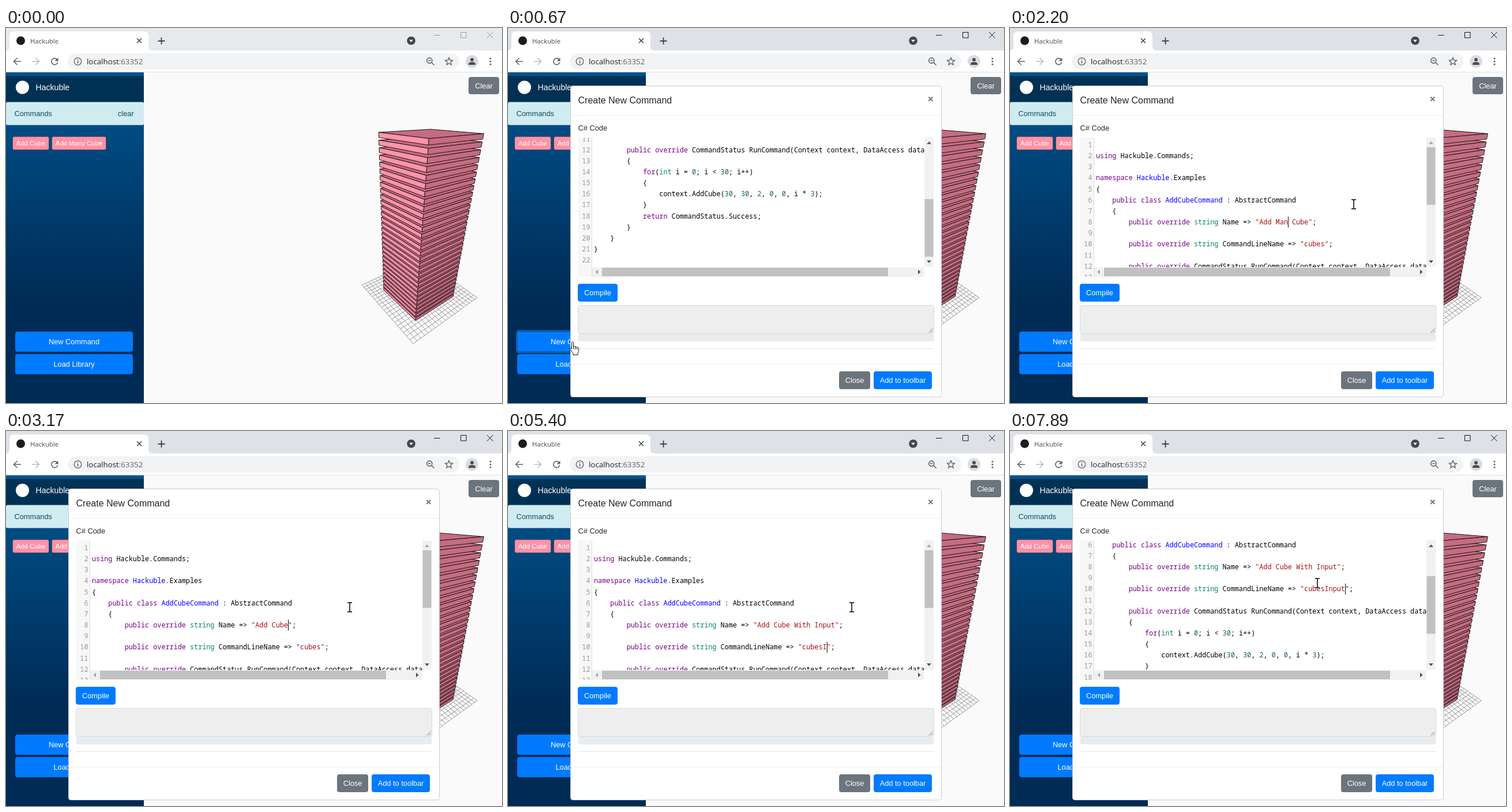
Write an HTML page that moves like this. It is 860 by 651 pixels and loops after 8 s.

```html
<!DOCTYPE html>
<html lang="en">
<head>
<meta charset="utf-8">
<title>Create New Command</title>
<style>
html, body { margin: 0; width: 100%; height: 100%; overflow: hidden; background: #fff; }
svg { display: block; width: 860px; height: 651px; }
text { font: 12.8px "Liberation Sans", Arial, sans-serif; white-space: pre; fill: #212529; }
.ui { font-family: "Open Sans", "Noto Sans", sans-serif; }
.code text { font: 11.8px "Noto Sans Mono", monospace; fill: #000; }
.code .num { fill: #999; text-anchor: end; }
.mid { text-anchor: middle; fill: #fff; }
.icon { fill: none; stroke: #5f6368; stroke-width: 1.6; }
.kw { fill: #708; } .type { fill: #085; } .def { fill: #00f; }
.str { fill: #a11; } .lit { fill: #164; }
</style>
</head>
<body>
<svg id="stage" viewBox="0 0 860 651" xmlns="http://www.w3.org/2000/svg">
  <defs>
    <linearGradient id="side" x1="0" y1="0" x2="0" y2="1">
      <stop offset="0" stop-color="#005590"/><stop offset=".7" stop-color="#002b55"/>
    </linearGradient>
    <clipPath id="view"><rect x="146" y="190" width="576" height="225"/></clipPath>
    <clipPath id="rail"><rect x="121" y="190" width="25" height="242"/></clipPath>
  </defs>

  <!-- browser frame -->
  <rect id="strip" width="860" height="40"/>
  <path d="M0 39q6 0 6-7V14q0-8 8-8H239q8 0 8 8V32q0 7 7 7z" fill="#fff"/>
  <rect y="39" width="860" height="38" fill="#fff"/>
  <rect y="76" width="860" height="1" fill="#dcdee1"/>
  <circle cx="25.5" cy="22" r="7.5" fill="#1c1c1c"/>
  <text class="ui" x="42" y="27" style="font-size:11.3px;fill:#45494d">Hackuble</text>
  <path class="icon" d="M227 18l8 8m0-8l-8 8" style="stroke:#3c4043;stroke-width:1.5"/>
  <path class="icon" d="M263.500 22.500h12m-6-6v12" style="stroke:#3c4043;stroke-width:1.8"/>
  <circle cx="702.500" cy="22" r="7.300" fill="#43474b"/>
  <path d="M699 20.500h7l-3.500 4z" fill="#fff"/>
  <path id="win" fill="none" d="M742 12.500h10.500M788.500 7.500h9.500v9.500h-9.500zM834 7l10.500 10.500m0-10.500L834 17.500"/>
  <path class="icon" d="M26 58H14m5.500-6l-6 6 6 6"/>
  <path class="icon" d="M45 58h12m-5.500-6l6 6-6 6" style="stroke:#b9bcc0"/>
  <path class="icon" d="M88.500 54.500a5.500 5.500 0 1 0 1.200 5"/>
  <path d="M90.500 51.500v6h-6z" fill="#5f6368"/>
  <rect x="107" y="44" width="679" height="28" rx="14" fill="#f1f3f4"/>
  <circle class="icon" cx="124.500" cy="58" r="6.300" style="stroke-width:1.300"/>
  <path class="icon" d="M124.500 57v4.500m0-7.500v1.500"/>
  <text class="ui" x="140" y="63" style="font-size:13.300px;fill:#202124">localhost<tspan fill="#5f6368">:63352</tspan></text>
  <circle class="icon" cx="734.300" cy="56.500" r="4.600"/>
  <path class="icon" d="M738 60l4.500 4.500M732 56.500h4.600" style="stroke-width:1.500"/>
  <path class="icon" d="M768 51.500l1.900 4.300 4.600.4-3.500 3.100 1.100 4.600-4.100-2.500-4.100 2.500 1.100-4.600-3.500-3.100 4.600-.4z" style="stroke-width:1.400"/>
  <circle cx="808" cy="58" r="11" fill="#dadce0"/>
  <circle cx="808" cy="55" r="3" fill="#4a4e52"/>
  <path d="M802 64v-1.500q0-3.500 6-3.500t6 3.500V64z" fill="#4a4e52"/>
  <g fill="#5f6368"><circle cx="840" cy="53" r="1.600"/><circle cx="840" cy="58" r="1.600"/><circle cx="840" cy="63" r="1.600"/></g>

  <!-- page -->
  <rect y="77" width="860" height="574" fill="#fafafa"/>
  <g id="tower"></g>
  <rect y="77" width="239" height="574" fill="url(#side)"/>
  <rect y="83" width="239" height="46" fill="#000" opacity=".4"/>
  <circle cx="28.500" cy="103" r="11.500" fill="#fff"/>
  <text x="51.500" y="107.500" style="font-size:14.080px;fill:#fff">Hackuble</text>
  <rect y="128.500" width="239" height="40" rx="3" fill="#d1ecf1"/>
  <text x="14.500" y="153" style="fill:#0c4a66">Commands</text>
  <text x="194" y="153" style="fill:#0c4a66">clear</text>
  <g id="page"></g>

  <!-- dialog -->
  <g id="modal">
    <rect x="108.500" y="100.500" width="643" height="540" rx="4" fill="#fff" stroke="#ccc"/>
    <path d="M109 151.500H751M109 583.500H751" stroke="#eceef1"/>
    <text x="121.500" y="131" style="font-size:16px">Create New Command</text>
    <path d="M729.300 119.700l7 7m0-7l-7 7" stroke="#7a7a7a" stroke-width="2.200"/>
    <text x="121.500" y="178">C# Code</text>
    <rect x="121.500" y="190" width="24" height="242" fill="#f7f7f7"/>
    <path d="M145.500 190V432" stroke="#ddd"/>
    <g class="code" clip-path="url(#rail)"><g id="nums"></g></g>
    <g class="code" clip-path="url(#view)">
      <g id="lines"><rect id="caret" width="1" height="19" fill="#000"/></g>
    </g>
    <path d="M722 190h16v225h-16zM146 415.500h575.500V432H146z" fill="#f1f1f1"/>
    <rect id="thumb" x="722.500" width="15" height="100" fill="#c1c1c1"/>
    <rect x="163" y="416" width="496" height="15" fill="#c1c1c1"/>
    <path id="up" d="M726 201.500h8l-4-4.500z"/>
    <path d="M726 403.500h8l-4 4.500zM711 419.500v8l4.500-4z" fill="#505050"/>
    <path d="M156 419.500v8l-4.500-4z" fill="#a3a3a3"/>
    <rect x="121.500" y="481.500" width="617" height="49" rx="3" fill="#eee" stroke="#d5d9dd"/>
    <path d="M729.500 528.500l7-7m-3 7l3-3" stroke="#777" fill="none"/>
    <rect x="121.500" y="531" width="617" height="13" rx="3" fill="#e9ecef"/>
    <path d="M121.500 556.500H738.500" stroke="#e5e5e5"/>
    <g id="actions"></g>
  </g>

  <!-- pointers -->
  <g id="hand">
    <path d="M-1.500 1.500a1.500 1.500 0 0 1 3 0v6q3-1 3 1.200q3-1 3 1q3-.8 3 1.500v4.500q0 2-1.500 3.500v3.300h-8v-2.800l-5-6.500q-1.500-2.200.5-3q1.500-.3 2 2z" fill="#fff" stroke="#111"/>
    <path d="M1.500 7.500v5M4.500 9v4M7.500 10v3" stroke="#111" fill="none"/>
  </g>
  <g id="beam" fill="none">
    <path d="M-4 -8h3l1 1 1-1h3M0 -7V7M-4 8h3l1-1 1 1h3" stroke="#fff" stroke-width="3"/>
    <path d="M-4 -8h3l1 1 1-1h3M0 -7V7M-4 8h3l1-1 1 1h3" stroke="#000" stroke-width="1.500"/>
  </g>
  <path id="arrow" d="M.5 .5v16l3.700-3.500 2.500 5.700 2.500-1.100-2.500-5.500h5z" fill="#fff" stroke="#111"/>
</svg>

<script>
const $ = id => document.getElementById(id);
const add = (id, html) => $(id).insertAdjacentHTML('beforeend', html);
const show = (el, on) => el.setAttribute('visibility', on ? 'inherit' : 'hidden');
const move = (el, x, y) => el.setAttribute('transform', `translate(${x} ${y})`);

const LOOP = 8000, STEP = 109.7, CHAR = 7.083, LEFT = 149, PITCH = 19.15;

function button(x, y, w, h, label, fill, size = 12.8, edge = fill, id = '') {
  return `<rect id="${id}" x="${x}" y="${y}" width="${w}" height="${h}" rx="3" fill="${fill}" stroke="${edge}"/>
    <text class="mid" x="${x + w / 2}" y="${y + h / 2 + size * .36}" style="font-size:${size}px">${label}</text>`;
}
const BLUE = '#007bff', GREY = '#6c757d', PINK = '#ff91a6';
add('page',
  '<rect id="ring" x="14" y="524.5" width="208.500" height="40" rx="5" fill="#268fff" opacity=".5"/>' +
  button(11.5, 188.5, 63, 23, 'Add Cube', PINK, 11.4, '#4b4a5c') +
  button(79.5, 188.5, 94, 23, 'Add Many Cube', PINK, 11.4, '#4b4a5c') +
  button(16.5, 527.5, 203, 34, 'New Command', BLUE, 12.8, BLUE, 'create') +
  button(16.5, 566.5, 203, 34, 'Load Library', BLUE) +
  button(802.5, 85.5, 52, 29, 'Clear', GREY));
add('actions',
  button(121.5, 444.5, 68, 30, 'Compile', BLUE) +
  button(574.5, 596.5, 53, 30, 'Close', GREY) +
  button(634.5, 596.5, 100, 30, 'Add to toolbar', BLUE));

// Perspective: homogeneous corners of a ground square, z is height
const corner = (x, y, w) => [x * w, y * w, w];
const BASE = [corner(710, 508, 230), corner(775.2, 466, 260), corner(655, 455, 269)];
const FLOOR = [corner(706, 548, 207.3), corner(817, 468, 258.5), corner(617, 446, 277)];
const DOWN = [673, 1009, 1];
function project([front, right, left], u, v, z = 0) {
  const [x, y, w] = front.map((f, i) => f + u * (right[i] - f) + v * (left[i] - f) - z * DOWN[i]);
  return (x / w).toFixed(1) + ' ' + (y / w).toFixed(1);
}
function face(fill, ...pts) {
  return `<path d="M${pts.map(p => project(BASE, ...p)).join('L')}z" fill="${fill}"/>`;
}
function tower() {
  const n = 20;
  let grid = '', slabs = '';
  for (let i = 0; i <= n; i++) {
    const k = i / n;
    grid += `M${project(FLOOR, k, 0)}L${project(FLOOR, k, 1)}M${project(FLOOR, 0, k)}L${project(FLOOR, 1, k)}`;
  }
  for (let i = 0; i < 30; i++) {
    const a = i * 3, b = a + 2;
    slabs += face('#c56c81', [0, 0, b], [1, 0, b], [1, 1, b], [0, 1, b]) +
      face('#ff93a9', [0, 0, a], [0, 0, b], [0, 1, b], [0, 1, a]) +
      face('#c56c81', [0, 0, a], [0, 0, b], [1, 0, b], [1, 0, a]);
  }
  return `<path d="${grid}" fill="none" stroke="#8c8c8c" stroke-width=".9"/>
    <g stroke="#1d1518" stroke-linejoin="round">${slabs}</g>`;
}
add('tower', tower());

// Code editor
const nameLine = s => `        public override string Name => "${s}";`;
const idLine = s => `        public override string CommandLineName => "${s}";`;
const code = ['', 'using Hackuble.Commands;', '', 'namespace Hackuble.Examples', '{',
  '    public class AddCubeCommand : AbstractCommand', '    {',
  '', '', '', '',
  '        public override CommandStatus RunCommand(Context context, DataAccess data)',
  '        {', '            for(int i = 0; i < 30; i++)', '            {',
  '                context.AddCube(30, 30, 2, 0, 0, i * 3);', '            }',
  '            return CommandStatus.Success;', '        }', '    }', '}', ''];
const TOKENS = /("[^"]*")|\b(public|override|class|using|namespace|for|return)\b|\b(string|int)\b|\b(\d+)\b|(?<=class |namespace )(\w+)/g;
const KINDS = ['str', 'kw', 'type', 'lit', 'def'];
function paint(s) {
  return s.trimStart().replace(/</g, '&lt;').replace(TOKENS, (m, ...g) =>
    `<tspan class="${KINDS[g.findIndex((x, i) => i < 5 && x)]}">${m}</tspan>`);
}
code.forEach((s, i) => {
  const y = 207 + i * PITCH, indent = s.length - s.trimStart().length;
  add('nums', `<text class="num" x="142.5" y="${y}">${i + 1}</text>`);
  const x = LEFT + CHAR * (i === 7 || i === 9 ? 8 : indent);
  add('lines', `<text id="row${i + 1}" x="${x}" y="${y}">${paint(s)}</text>`);
});
$('lines').append($('caret'));

// Stepped tracks: [time, value...]
const scroll = [[0, 202], [1110, 84], [1210, 0], [6710, 60], [6820, 101]];
const erased = [[0, 5], [2200, 4], [2300, 3], [2410, 2], [2520, 1], [2630, 0]];
const arrows = [[0, 0], [2860, 1], [2960, 3], [3070, 4], [3170, 5]];
const typed = [[0, 0], [3400, 1], [3510, 3], [3620, 4], [3730, 6], [3840, 7], [3950, 9], [4060, 12], [4170, 11]];
const suffix = [[0, 0], [5400, 1], [5510, 2], [5610, 3], [5720, 4], [5950, 5]];
const lower = [[4390, 9, 0], [4500, 10, 58], [4720, 10, 57], [4840, 10, 56], [5060, 10, 55], [5170, 10, 56]];
const at = (track, t) => track.findLast(s => s[0] <= t).slice(1);

// Pointer stops, joined by straight moves: [time, shape, x, y]
const stops = [[0, ''], [100, 'arrow', 232, 606], [215, 'hand', 170, 570], [420, 'hand', 112, 545],
  [700, 'arrow', 112, 545], [870, 'beam', 377, 280], [1210, 'beam', 377, 280],
  [1640, 'beam', 489, 338], [1880, 'beam', 489, 338], [2190, 'beam', 596, 306],
  [6100, 'beam', 596, 306], [6470, 'beam', 609, 276], [6820, 'beam', 625, 250],
  [7060, 'arrow', 752, 110], [7240, 'arrow', 825, 24], [7350, 'arrow', 700, 80],
  [7440, 'beam', 450, 192], [7560, 'beam', 250, 295], [7670, 'beam', 310, 323],
  [7780, 'beam', 438, 259], [7890, 'beam', 533, 264]];
function pointer(t) {
  const i = stops.findLastIndex(s => s[0] <= t), from = stops[i], to = stops[i + 1] || from;
  const k = to === from ? 0 : (t - from[0]) / (to[0] - from[0]);
  return [from[1], from[2] + (to[2] - from[2]) * k, from[3] + (to[3] - from[3]) * k];
}

const shown = {};
function setRow(n, s) {
  if (shown[n] === s) return;
  shown[n] = s;
  $('row' + n).innerHTML = paint(s);
}

function draw(t) {
  const pressed = t >= 560;
  $('strip').setAttribute('fill', pressed ? '#dee1e6' : '#e7eaed');
  $('win').setAttribute('stroke', pressed ? '#111' : '#999');
  const focus = pressed && t < 1870;
  show($('ring'), focus);
  $('create').setAttribute('stroke', focus ? '#0062cc' : BLUE);
  show($('modal'), t >= 670);

  const [top] = at(scroll, t);
  move($('nums'), 0, -top);
  move($('lines'), 0, -top);
  $('thumb').setAttribute('y', 207 + top * .4455);
  $('up').setAttribute('fill', top ? '#505050' : '#a3a3a3');

  const [kept] = at(erased, t), [right] = at(arrows, t), [len] = at(typed, t), [tail] = at(suffix, t);
  setRow(8, nameLine('Add' + ' Many'.slice(0, kept) + ' Cube' + ' With Inputt'.slice(0, len)));
  setRow(10, idLine('cubes' + 'Input'.slice(0, tail)));

  let line = 8, col = 43 + kept + right + len;
  if (t >= 4390) {
    [line, col] = at(lower, t);
    col += tail;
  }
  $('caret').setAttribute('x', LEFT + col * CHAR);
  $('caret').setAttribute('y', 193.5 + (line - 1) * PITCH);
  show($('caret'), t >= 1870 && !(t >= 7360 && t < 7890));

  // The pointer is only redrawn on the screen recorder's clock
  const [kind, x, y] = pointer(Math.floor((t + 15) / STEP) * STEP);
  for (const k of ['hand', 'beam', 'arrow']) {
    show($(k), k === kind);
    if (k === kind) move($(k), Math.round(x), Math.round(y));
  }
}

const start = performance.now();
function tick() {
  draw((performance.now() - start) % LOOP);
  requestAnimationFrame(tick);
}
draw(0);
tick();
</script>
</body>
</html>
```
